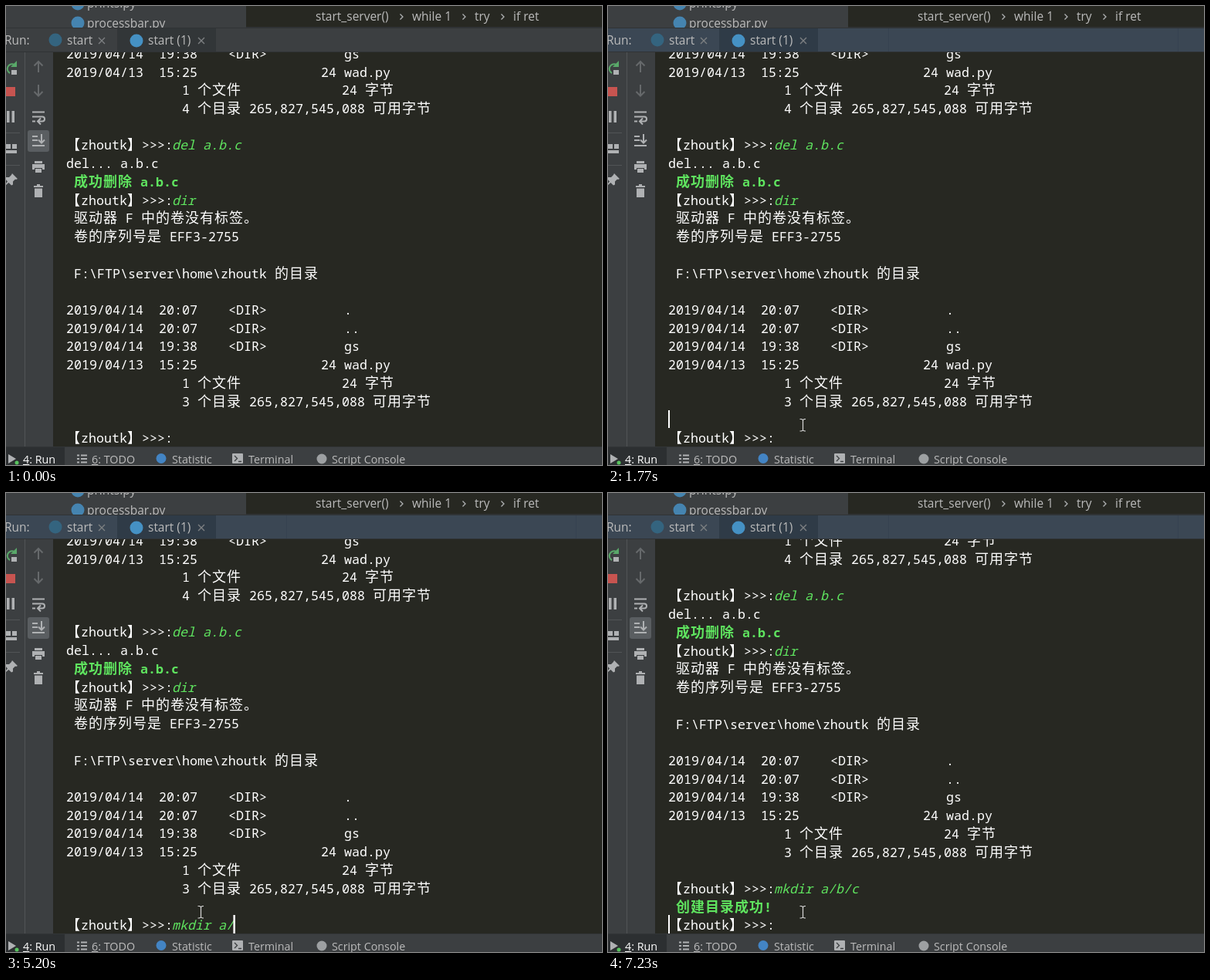
Recreate the animation shown at these times as an HTML page. Size 772 by 595 pixels, loop 8 s.

```html
<!DOCTYPE html>
<html lang="zh-CN">
<head>
<meta charset="utf-8">
<title>Console session</title>
<style>
html, body { margin: 0; width: 100%; height: 100%; overflow: hidden; background: #272822; }
svg { display: block; }
.ui { font: 15.5px "Open Sans", "Noto Sans", sans-serif; fill: #bbb; }
.small { font-size: 14.3px; }
.row { font: 16.667px "Noto Sans Mono", "DejaVu Sans Mono", monospace; fill: #fff; }
.row .han { font-family: "Noto Sans CJK SC", "Noto Sans CJK JP", "Noto Sans CJK", sans-serif; font-size: 18px; letter-spacing: 1px; }
.row:not(.ok) .han { font-weight: 300; }
.cmd { font-style: italic; fill: #5fe45f; }
.ok { font-weight: bold; fill: #5fe45f; }
.icon { fill: none; stroke: #afb1b3; stroke-width: 2; }
.solid { fill: #afb1b3; }
.dim { stroke: #66696b; }
.thin { stroke-width: 1.3; }
</style>
</head>
<body>
<svg width="772" height="595" viewBox="0 0 772 595">
  <defs>
    <clipPath id="view"><rect x="61" y="60" width="711" height="511"/></clipPath>
    <clipPath id="treeView"><rect width="311" height="28"/></clipPath>
  </defs>

  <!-- project tree and breadcrumbs -->
  <rect width="311" height="28" fill="#3c3f41"/>
  <g class="ui" clip-path="url(#treeView)">
    <circle cx="93" cy="-3" r="8.5" fill="#4584b0"/>
    <circle cx="93" cy="22" r="8.5" fill="#4584b0"/>
    <text x="105" y="2">prints.py</text>
    <text x="105" y="28">processbar.py</text>
  </g>
  <g class="ui">
    <text x="401" y="19">start_server()</text>
    <text x="526" y="19">while 1</text>
    <text x="607" y="19">try</text>
    <text x="657" y="19">if ret</text>
  </g>
  <path class="icon thin" d="M510.500 10.500l3.500 3.500l-3.500 3.500M591.500 10.500l3.500 3.500l-3.500 3.500M641.500 10.500l3.500 3.500l-3.500 3.500"/>

  <!-- run tabs -->
  <rect id="head" y="29" width="772" height="31"/>
  <rect id="tab" x="144" y="29" width="128" height="31"/>
  <path id="seams" d="M363.500 29V59M738.500 29V59" stroke="#364250"/>
  <path d="M311 27.500H772M0 28.500H772M0 59.500H772" stroke="#303335"/>
  <circle cx="64" cy="44" r="8.500" fill="#34647f"/>
  <circle cx="169" cy="45" r="8.500" fill="#4591c4"/>
  <g class="ui">
    <text x="-2" y="50">Run:</text>
    <text x="79" y="50">start</text>
    <text x="184" y="50">start (1)</text>
  </g>
  <path class="icon thin" style="stroke:#7d8082" d="M120 41l8 8m0-8l-8 8M249 41l8 8m0-8l-8 8"/>

  <!-- side toolbars -->
  <path fill="#3c3f41" d="M0 60H61V571H0z"/>
  <path stroke="#515456" fill="none" d="M24.500 60V571M0 164.500H18M0 206.500H18"/>
  <path class="icon" style="stroke:#59a869" d="M11 76A6 6 0 1 0 5 87"/>
  <path fill="#59a869" d="M14 71v8H6z"/>
  <rect class="solid" x="7" y="83" width="7" height="6"/>
  <rect y="105" width="12" height="12" fill="#c75450"/>
  <path class="solid" d="M1 136h3.500v15H1zM7.500 136H11v15H7.500z"/>
  <path class="solid" d="M0 179h6v6H0zM8 179h6v6H8zM0 187h14v4H0z"/>
  <path class="solid" d="M8 217l7 7l-2 1l-1-.5l-3 3l0 4l-2 1l-3.500-3.500L0 232v-2l2-2.500L-1 224l1-2h4l3-3z"/>

  <rect id="pressed" x="28" y="161" width="28" height="28" rx="3" fill="#5a5e61"/>
  <path class="icon dim" d="M42 86V72M36.500 77.500L42 72l5.500 5.500M42 102V116M36.500 111L42 116.500l5.500-5.500"/>
  <path class="icon" d="M34 137.500H50M34 143.500H47a3 3 0 0 1 0 6H42M34 149.500H38M45 145.500l-4 4l4 4"/>
  <path class="icon" d="M34 169H41M34 174H41M34 181H50M46 166V177M42 173.500l4 4l4-4"/>
  <path class="solid" d="M37 201h10v3H37zM34 205h16v7h-3v-2H37v2h-3zM38 211h8v5h-8z"/>
  <path class="solid" d="M36 233h4v-2h4v2h4v2H36zM37 236.500h10V248H37z"/>

  <!-- console text -->
  <g clip-path="url(#view)"><g id="rows"></g></g>
  <rect id="caret" fill="#fff"/>

  <!-- bottom bar -->
  <rect y="571" width="772" height="24" fill="#3c3f41"/>
  <rect y="572" width="76" height="23" fill="#2c2f31"/>
  <path d="M0 571.500H772" stroke="#323537"/>
  <path class="solid" d="M3 581l10 6l-10 6z"/>
  <circle cx="14" cy="592" r="2.500" fill="#59c45f"/>
  <path class="icon" d="M92 582.500h3m2 0h8M92 587h3m2 0h8M92 591.500h3m2 0h8"/>
  <circle cx="201" cy="586.500" r="6.500" fill="#4384c4"/>
  <rect class="solid" x="293" y="580" width="14" height="13" rx="1"/>
  <path class="icon thin" style="stroke:#3c3f41" d="M296 583l3.500 3.500l-3.500 3.500M301 590.500h4"/>
  <circle cx="409" cy="587" r="6.500" fill="#9da0a2"/>
  <g class="ui small">
    <text x="22" y="593" fill="#fff"><tspan text-decoration="underline">4</tspan>: Run</text>
    <text x="111" y="593"><tspan text-decoration="underline">6</tspan>: TODO</text>
    <text x="215" y="593">Statistic</text>
    <text x="314" y="593">Terminal</text>
    <text x="422" y="593">Script Console</text>
  </g>

  <!-- mouse -->
  <path id="beam" fill="none" stroke="#d8d8d8" stroke-width="1.200" d="M-3.500-7.500H-1.500L.5-6.500L2.500-7.500H4M.5-6.500V7M-3.500 8H-1.500L.5 7L2.500 8H4"/>
  <path id="arrow" fill="#fff" stroke="#222" stroke-width=".8" d="M0 0V16L4 12.500L6.500 18L9 17L6.500 11.500H11.500z"/>
</svg>
<script>
const $ = id => document.getElementById(id);
const LEFT = 78, CELL = 10, WIDE = 19, PITCH = 23.72, LAST = 566, PROMPT_ROW = 21;
const user = 'zhoutk', prompt = `【${user}】>>>:`, command = 'mkdir a/b/c';
const keyTimes = [2620, 2770, 3090, 3170, 3490, 4040, 4570, 5200, 5670, 5810, 6510];

function svgNode(tag, parent, attrs) {
  const node = document.createElementNS('http://www.w3.org/2000/svg', tag);
  for (const key in attrs) node.setAttribute(key, attrs[key]);
  return parent.appendChild(node);
}

// Places each word on the character grid; Chinese glyphs take wider cells.
function write(row, text, style = '', x = LEFT) {
  const y = Math.round(LAST + (row - PROMPT_ROW) * PITCH);
  const line = svgNode('text', $('rows'), { class: 'row ' + style, y });
  for (const run of text.match(/ +|[\u3000-\uffef]+|[^ \u3000-\uffef]+/g)) {
    const han = run[0] >= '\u3000';
    if (run[0] !== ' ') svgNode('tspan', line, { x, class: han ? 'han' : '' }).textContent = run;
    x += run.length * (han ? WIDE : CELL);
  }
  return line;
}

const indent = ' '.repeat(15);
const folder = (time, name) => `2019/04/14  ${time}    <DIR>`.padEnd(36) + name;
const file = '2019/04/13  15:25'.padEnd(33) + '24 wad.py';
const count = indent + '1 个文件' + ' '.repeat(13) + '24 字节';
const total = n => indent + n + ' 个目录 265,827,545,088 可用字节';

[
  folder('19:38', 'gs'), file, count, total(4), '',
  prompt, 'del... a.b.c', '', prompt,
  ' 驱动器 F 中的卷没有标签。', ' 卷的序列号是 EFF3-2755', '',
  ` F:\\FTP\\server\\home\\${user} 的目录`, '',
  folder('20:07', '.'), folder('20:07', '..'), folder('19:38', 'gs'), file,
  count, total(3), '', prompt
].forEach((text, row) => text && write(row, text));

const cmdX = LEFT + 2 * WIDE + 10 * CELL - 1;
write(5, 'del a.b.c', 'cmd', cmdX);
write(7, ' 成功删除 a.b.c', 'ok');
write(8, 'dir', 'cmd', cmdX);
const keys = [...command].map((c, i) => write(PROMPT_ROW, c, 'cmd', cmdX + i * CELL));
const reply = [write(22, ' 创建目录成功!', 'ok'), write(23, prompt)];

const show = (node, on) => node.setAttribute('visibility', on ? 'visible' : 'hidden');

function caretAt(t, typed) {
  if (t < 1060 || (t >= 2560 && t < 2620) || (t >= 4040 && t < 4250)) return null;
  if (t < 2560) return { x: LEFT, y: 524, width: 2, height: 23 };
  if (t < 6910) return { x: cmdX - 0.6 + typed * CELL, y: 547, width: 2.5, height: 24 };
  return { x: LEFT, y: 547, width: 2, height: 24 };
}

function mouseAt(t) {
  if (t >= 1770) return [252, 543];
  if (t >= 1690) return [262, 540];
  const rest = 1 - Math.min(7, Math.floor((t - 280) / 78.5)) / 7;
  const k = rest ** 1.5;
  return [Math.round(277 + 238 * k), Math.round(534 + 42 * k)];
}

function draw(t) {
  const focused = t >= 1140;
  $('head').setAttribute('fill', focused ? '#3b4754' : '#3c3f41');
  $('tab').setAttribute('fill', focused ? '#2f3b47' : '#323638');
  show($('seams'), focused);
  show($('pressed'), t < 1520 || t >= 4040);

  const typed = keyTimes.filter(k => t >= k).length;
  keys.forEach((key, i) => show(key, i < typed));
  reply.forEach(line => show(line, t >= 7230));
  const scroll = (t >= 6910) + (t >= 7230);
  $('rows').setAttribute('transform', `translate(0 ${-Math.round(scroll * PITCH)})`);

  const caret = caretAt(t, typed);
  show($('caret'), caret);
  for (const key in caret) $('caret').setAttribute(key, caret[key]);

  const [x, y] = mouseAt(t), inBar = y > 571;
  show($('beam'), t >= 280 && !inBar);
  show($('arrow'), t >= 280 && inBar);
  for (const id of ['beam', 'arrow']) $(id).setAttribute('transform', `translate(${x} ${y})`);
}

const start = performance.now();
function tick() {
  draw((performance.now() - start) % 8000);
  requestAnimationFrame(tick);
}
tick();
</script>
</body>
</html>
```
